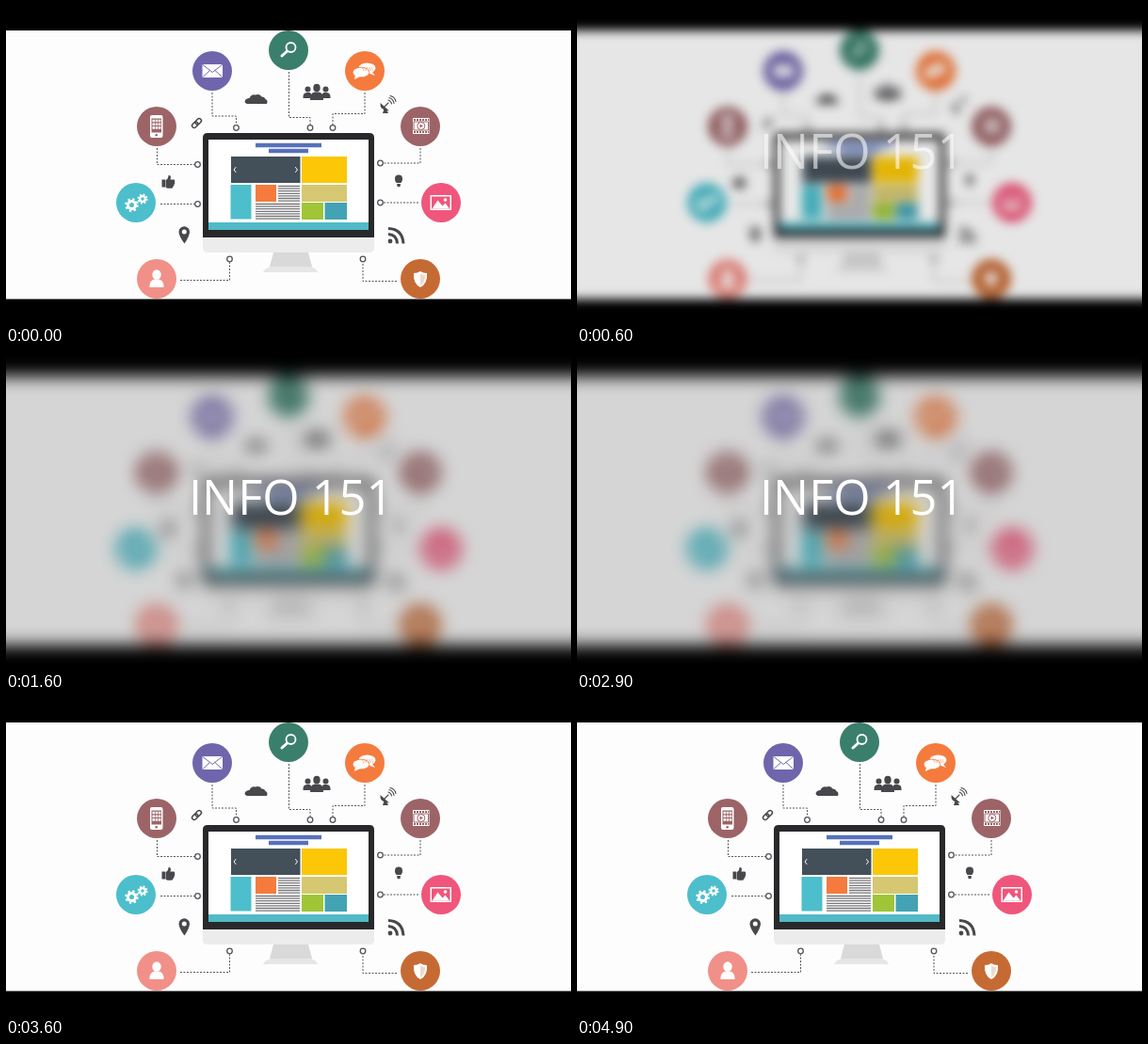
An HTML page that plays this animation: 600x338 px, repeating every 5000 ms.

```html
<!DOCTYPE html>
<html lang="en">
<head>
<meta charset="utf-8">
<title>INFO 151</title>
<style>
  html, body { margin: 0; width: 100%; height: 100%; overflow: hidden; background: #000; }
  svg { display: block; width: 600px; height: 338px; }
  #title { font: 50.5px "Open Sans", sans-serif; fill: #fff; }
  .line { fill: none; stroke-linecap: round; stroke-linejoin: round; }
</style>
</head>
<body>
<svg viewBox="0 0 600 338">
  <g id="scene">
    <rect x="-60" y="-60" width="720" height="460"/>
    <rect x="-60" y="26" width="720" height="285.5" fill="#fdfdfd"/>

    <g id="links" fill="none" stroke="#55555a"></g>

    <!-- monitor -->
    <path d="M284 262h37l4 15h-45z" fill="#d9d9d9"/>
    <path d="M273 283q1-4 8-6h43q6 2 7 6z" fill="#e6e6e6"/>
    <path d="M209 245h182v12q0 5-5 5H214q-5 0-5-5z" fill="#ececec"/>
    <path d="M209 246V140q0-5 5-5h172q5 0 5 5v106z" fill="#29282b"/>
    <path d="M215 142h170v96H215z" fill="#fff"/>
    <path d="M215 230h170v8H215z" fill="#50bac6"/>
    <path d="M265 148h70M279 154h42" stroke="#5671bb" stroke-width="4.600"/>
    <path d="M239 160h73.500v28H239z" fill="#434f59"/>
    <path d="M314 160h48v28h-48z" fill="#fbc707"/>
    <path d="M238.500 190h22v36.500h-22z" fill="#4dbecb"/>
    <path d="M265 190h22v18h-22z" fill="#f47b3d"/>
    <path d="M314 190h48v18h-48z" fill="#d6c772"/>
    <path d="M314 209h23v18h-23z" fill="#a0c536"/>
    <path d="M338.500 209H362v18h-23.500z" fill="#43a3b4"/>
    <path id="copy" stroke="#77777b" stroke-width="1.300"/>
    <path d="m244 171.500-2 2.500 2 2.500M307.500 171.500l2 2.500-2 2.500" class="line" stroke="#fff"/>

    <g id="discs"></g>

    <!-- white icons -->
    <g fill="#fff">
      <path d="M208.500 62h21.500v14h-21.500z"/>
      <path d="m209 62.500 10.200 8 10.300-8M209 75.500l7.500-7M229.500 75.500l-7.500-7" class="line" stroke="#6f65ac"/>
      <circle cx="302.500" cy="44" r="5" class="line" stroke="#fff" stroke-width="1.800"/>
      <path d="m298.500 48-5.500 5" class="line" stroke="#fff" stroke-width="3"/>
      <ellipse cx="383.500" cy="66" rx="9" ry="5.500"/>
      <path d="m388 69 4 5-8-3z"/>
      <g stroke="#f47b3d" stroke-width=".8">
        <ellipse cx="377" cy="70.500" rx="8.800" ry="5.300"/>
        <path d="M378 66h11M379 68h11" stroke-dasharray="1.500 1"/>
      </g>
      <path d="m371 73-1 5 6-3z"/>
      <rect x="153" y="116" width="13.500" height="24" rx="2"/>
      <path d="M154.500 119.500h10.500v15h-10.500z" fill="#9c6467"/>
      <path d="M155.500 122h9M155.500 125.700h9M155.500 129.400h9" stroke="#fff" stroke-width="2.600" stroke-dasharray="2.500 .7"/>
      <circle cx="159.700" cy="137.200" r="1.300" fill="#9c6467"/>
      <path d="M432 119h17.500v17H432z"/>
      <g stroke="#9c6467" fill="none">
        <path d="M433 121h16M433 134h16" stroke-width="1.800" stroke-dasharray="2 1"/>
        <path d="M433 123h15.500v9H433z"/>
        <circle cx="440.800" cy="127.500" r="4" fill="#fff"/>
      </g>
      <path d="m439.500 125.500 3.500 2-3.500 2z" fill="#9c6467"/>
      <g fill="none" stroke="#fff">
        <circle cx="133.500" cy="211.500" r="4" stroke-width="3"/>
        <circle cx="133.500" cy="211.500" r="6.300" stroke-width="2" stroke-dasharray="2.400 2.548"/>
        <circle cx="145" cy="205" r="2.900" stroke-width="2.300"/>
        <circle cx="145" cy="205" r="4.700" stroke-width="1.700" stroke-dasharray="1.900 1.791"/>
      </g>
      <path d="M450.500 201h22.500v16h-22.500z"/>
      <path d="M452 202.500h19.500v13H452z" fill="#f0567b"/>
      <path d="m452.500 215.500 6-9 5 6 3-3 4.500 6z"/>
      <circle cx="466.500" cy="206" r="1.800"/>
      <ellipse cx="160" cy="285.500" rx="4.700" ry="5.300"/>
      <path d="M152.500 299q-.5-7 5-8.500h5q5.500 1.500 5 8.500z"/>
      <path d="M440 282q3 2 7 2 1 11-7 15-8-4-7-15 4 0 7-2z"/>
      <path d="M440 284.500q3 1.500 5 1.500 0 8-5 11z" fill="#f0d8c8"/>
    </g>

    <!-- grey icons -->
    <g fill="#48484c">
      <g class="line" stroke="#48484c" stroke-width="1.500" transform="rotate(-45 202.500 124.500)">
        <rect x="196.500" y="122.200" width="7" height="4.600" rx="2.300"/>
        <rect x="201.500" y="122.200" width="7" height="4.600" rx="2.300"/>
      </g>
      <path d="M256 104q-4-1-1.500-4.500 2-2 4-1.500 2-4.500 6-3.500 5-1.500 7 2 3-.5 4 2.500 3 1 1.500 5z"/>
      <circle cx="320.500" cy="88.500" r="3"/><circle cx="339.500" cy="88.500" r="3"/>
      <path d="M315.500 98q-.5-6 4-6h3q2 0 2 6zM344.500 98q.5-6-4-6h-3q-2 0-2 6z"/>
      <ellipse cx="330" cy="87" rx="3.700" ry="4.300"/>
      <path d="M323 100q-.5-8 5-8.500h4q5.500.5 5 8.500z"/>
      <path d="M397.500 103q-1 8 9.500 8.500z"/>
      <path d="m402 108-2 6h6l-2-4z"/>
      <path d="m402 107 4-4M406 100q3 1 3.500 4M407 97.500q4.500 1.500 5 6M408 95.500q5 1 6 6" class="line" stroke="#48484c" stroke-width="1.100"/>
      <path d="M165.500 184.500h3.500v8h-3.500z"/>
      <path d="M169.500 185q3-1 3-5 2.500-.5 2.500 2l-.5 2.500h4q1.500 1 .5 2.500 1 1.500-.5 2.500.5 1.500-1 2.200 0 2-2 2h-4l-2-1z"/>
      <path d="M414.500 188q-2-3-1.500-4.500a4 4 0 0 1 8 0q.5 1.500-1.500 4.500z"/>
      <path d="M415.300 189h3.500v2.500l-1.700 1-1.800-1z"/>
      <path d="M189.500 252.500q-6-8-6-12.500a5.700 5.700 0 0 1 11.500 0q0 4.500-5.500 12.500z"/>
      <circle cx="189.300" cy="240" r="2.500" fill="#fdfdfd"/>
      <circle cx="408" cy="250" r="2.400"/>
      <path d="M406 242.500q9 .5 9.500 10M406 236.500q15 .5 16 16" fill="none" stroke="#48484c" stroke-width="3"/>
    </g>
  </g>
  <text id="title" x="194" y="173">INFO 151</text>
</svg>
<script>
const byId = id => document.getElementById(id);
const clamp = v => Math.min(1, Math.max(0, v));

const discs = [
  [219, 69, '#6f65ac'], [300, 47, '#3a7f6b'], [381, 69, '#f47b3d'],
  [160, 128, '#9c6467'], [440, 128, '#9c6467'], [138, 209, '#4dbecb'],
  [462, 209, '#f0567b'], [160, 290, '#f19088'], [440, 290, '#c66a34']
];
byId('discs').innerHTML = discs.map(([x, y, fill]) =>
  `<circle cx="${x}" cy="${y}" r="21" fill="${fill}"/>`).join('');

// dotted route, then the centre of the ring that ends it
const links = [
  ['M219 92v25h25.500v10', 244.5, 129.5], ['M300.500 70v48.500h22.500v8', 323, 129.5],
  ['M381 92v22.500h-34v12', 347, 129.5], ['M160.500 151v17.500h40', 203.5, 168.5],
  ['M440 151v16h-40', 397.5, 167], ['M164 210.500h36', 203.5, 210.5],
  ['M438 209h-37', 397.5, 209], ['M185 291.500h52.500v-19', 237.5, 269],
  ['M415 292.500h-36v-20', 379, 269]
];
byId('links').innerHTML = links.map(([d, x, y]) =>
  `<path d="${d}" stroke-dasharray="2 1.500"/><circle cx="${x}" cy="${y}" r="2.800" stroke-width="1.300"/>`).join('');

let copy = '';
for (let i = 0; i < 7; i++) copy += `M289 ${191.5 + i * 2.6}h23M265 ${210.5 + i * 2.6}h47`;
byId('copy').setAttribute('d', copy);

const LOOP = 5000, STEP = 100;

function frame() {
  const t = Math.floor(performance.now() % LOOP / STEP) * STEP;
  const p = t < 2000 ? clamp((t - 50) / 950) : clamp((3550 - t) / 650);
  byId('scene').style.filter = p ? `blur(${9 * p}px) brightness(${1 - 0.16 * p})` : 'none';
  byId('title').style.opacity = p;
  requestAnimationFrame(frame);
}
frame();
</script>
</body>
</html>
```
